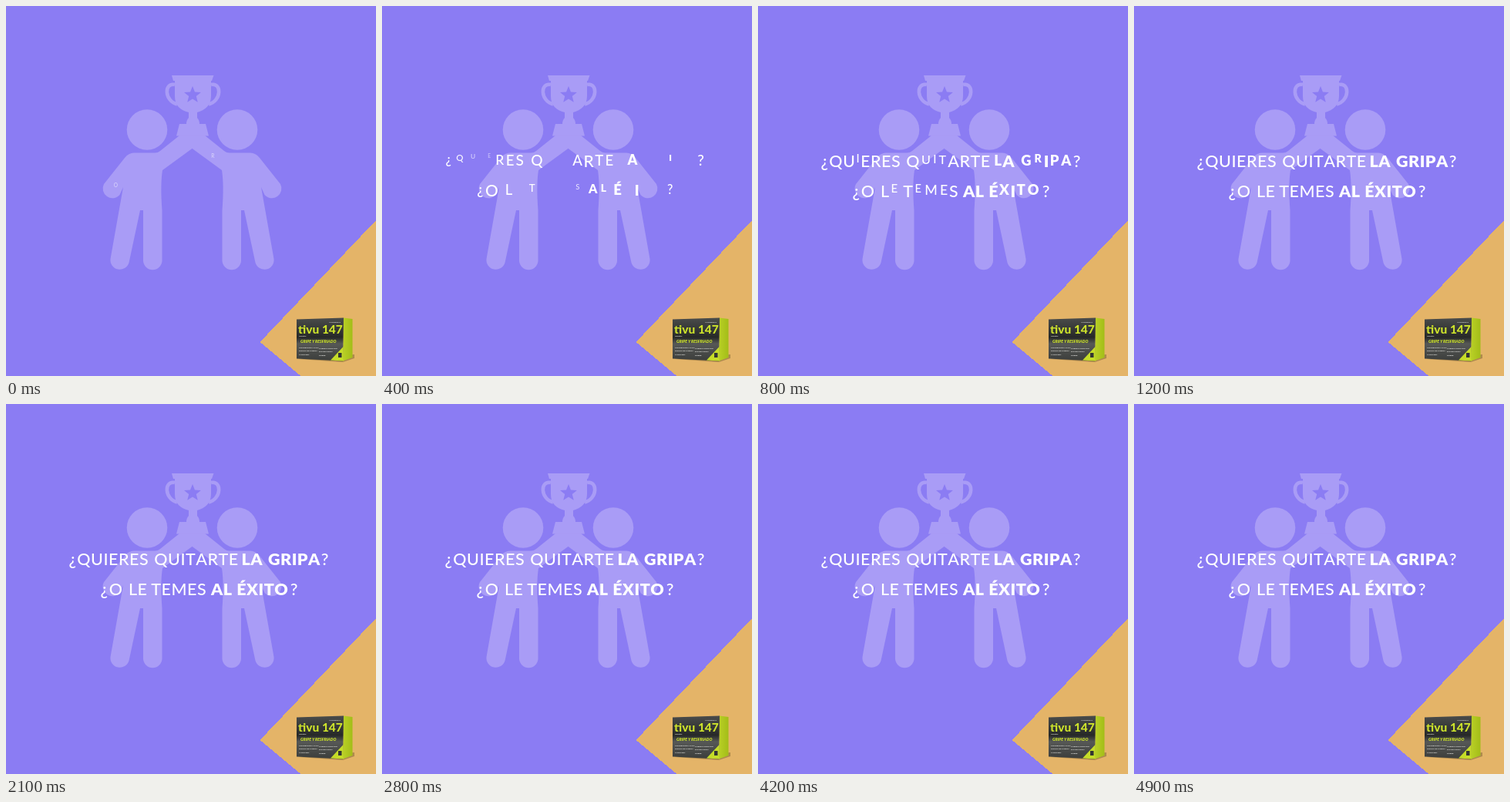
Recreate the animation shown at these times as an HTML page. Size 480 px wide and 480 px high, loop 5 s.

```html
<!DOCTYPE html>
<html lang="es">
<head>
<meta charset="utf-8">
<style>
  html, body { margin: 0; width: 100%; height: 100%; overflow: hidden; background: #8b7cf3; }
  svg { display: block; width: 100%; height: 100%; }
  text { font-family: Lato, sans-serif; }
  #title { fill: #fff; font-size: 21.5px; text-anchor: middle; }
  #tiny { fill: #e8e8e4; font-size: 2.6px; font-weight: 700; }
</style>
</head>
<body>
<svg viewBox="0 0 480 480">
  <defs>
    <linearGradient id="front" x2="0" y2="1">
      <stop offset="0" stop-color="#4a4c4b"/>
      <stop offset=".45" stop-color="#272928"/>
      <stop offset=".6" stop-color="#565856"/>
      <stop offset="1" stop-color="#3b3d3b"/>
    </linearGradient>
    <linearGradient id="side">
      <stop offset="0" stop-color="#b9d026"/>
      <stop offset="1" stop-color="#a3bd18"/>
    </linearGradient>
    <g id="person">
      <circle cx="183" cy="160.500" r="26.300"/>
      <path d="M166 190.500H193Q197 190.500 200 188L225 168H242V184.500L203 213Q200 232 202.500 265V331A12.300 12.300 0 0 1 178 331V265H174L159.500 333A12.300 12.300 0 0 1 135.500 328L152 235L147.500 245A12.500 12.500 0 0 1 127 231L154 197Q159 190.500 166 190.500Z"/>
    </g>
  </defs>

  <g fill="#a99cf6">
    <use href="#person"/>
    <use href="#person" transform="matrix(-1 0 0 1 483 0)"/>
    <path d="M215 90H269.500L267 97H266V117C266 129 258 135 248 138V145Q251 148 251 153H259L263 168.500H221L225 153H234Q234 148 237 145V138C226 135 219 129 219 117V97H217Z"/>
    <path d="M219 102C205 99 205 123 222 127.500M266 102C280 99 280 123 263 127.500" fill="none" stroke="#a99cf6" stroke-width="4.600"/>
  </g>
  <path id="star" fill="#8b7cf3"/>

  <path d="M480 278L329.500 436L382.500 480H480Z" fill="#e4b468" shape-rendering="crispEdges"/>

  <path d="M380 458L437 462L452 457V452Z" fill="#7d6334" opacity=".5"/>
  <path d="M438 404.500L449.500 406V456L437 460.500Z" fill="url(#side)"/>
  <path d="M377 406.500L438 404.500L437 460.500L377 457.500Z" fill="url(#front)"/>
  <path d="M437.500 442V460.500L421 459.500Z" fill="#c5dc28"/>
  <rect x="431" y="450" width="4.500" height="6" fill="#343632"/>
  <g fill="#cde32b" font-weight="800">
    <text x="379" y="425" font-size="15.500">tivu 147</text>
    <text x="382" y="436.500" font-size="5.200" font-style="italic" font-weight="900">GRIPE Y RESFRIADO</text>
  </g>
  <g id="tiny">
    <text x="419" y="411">ANTIGRIPAL</text>
    <text x="380" y="429">Tabletas</text>
    <text x="380" y="443.500">CONGESTIÓN NASAL</text>
    <text x="380" y="448">DOLOR DE CABEZA</text>
    <text x="380" y="452.500">LAGRIMEO</text>
    <text x="406" y="444.500">CUERPO CORTADO</text>
    <text x="406" y="449">ESTORNUDOS</text>
    <text x="406" y="453.500">FIEBRE</text>
  </g>

  <g id="title"></g>
</svg>
<script>
const LOOP = 5000, STEP = 100, GROW = 600, TRACKING = 0.5;
const LINE1 = 191, LINE2 = 229.6, REGULAR = 500, BOLD = 900;
const title = document.getElementById('title');
const pen = document.createElement('canvas').getContext('2d');
const letters = [];

// Each letter grows down from the top of its line after its own delay (ms).
function word(text, x, top, weight, delays) {
  pen.font = `${weight} 21.5px Lato, sans-serif`;
  [...text].forEach((char, i) => {
    const width = pen.measureText(char).width;
    const el = document.createElementNS('http://www.w3.org/2000/svg', 'text');
    el.textContent = char;
    el.setAttribute('y', 18.3);
    el.setAttribute('font-weight', weight);
    title.append(el);
    letters.push({ el, x: x + width / 2, top, delay: delays[i] });
    x += width + TRACKING;
  });
}

word('¿', 81.5, LINE1, REGULAR, [80]);
word('QUIERES', 92.3, LINE1, REGULAR, [210, 270, 540, 300, 60, 20, 0]);
word('QUITARTE', 192.3, LINE1, REGULAR, [0, 500, 530, 500, 20, -100, 20, 20]);
word('LA', 305.5, LINE1, BOLD, [420, 40]);
word('GRIPA', 340, LINE1, BOLD, [430, 550, 200, 430, 430]);
word('?', 408.8, LINE1, REGULAR, [0]);
word('¿', 122.5, LINE2, REGULAR, [30]);
word('O', 133.8, LINE2, REGULAR, [-100]);
word('LE', 159, LINE2, REGULAR, [30, 530]);
word('TEMES', 188.3, LINE2, REGULAR, [170, 540, 450, 450, 250]);
word('AL', 266, LINE2, BOLD, [100, 160]);
word('ÉXITO', 299.3, LINE2, BOLD, [20, 420, 0, 420, 440]);
word('?', 368.8, LINE2, REGULAR, [90]);

const points = Array.from({ length: 10 }, (_, i) => {
  const r = i % 2 ? 5 : 11.5, a = (i * 36 - 90) * Math.PI / 180;
  return `${242 + r * Math.cos(a)} ${115.5 + r * Math.sin(a)}`;
});
document.getElementById('star').setAttribute('d', `M${points.join('L')}Z`);

const start = performance.now();
function draw() {
  const elapsed = (performance.now() - start) % LOOP;
  const time = Math.floor(elapsed / STEP) * STEP;
  for (const { el, x, top, delay } of letters) {
    const u = Math.min(1, Math.max(0, (time - delay) / GROW));
    const size = 1 - (1 - u) ** 2;
    el.setAttribute('transform', `translate(${x} ${top}) scale(${size})`);
    el.setAttribute('opacity', Math.min(1, size * 1.8));
  }
  requestAnimationFrame(draw);
}
draw();
</script>
</body>
</html>
```
